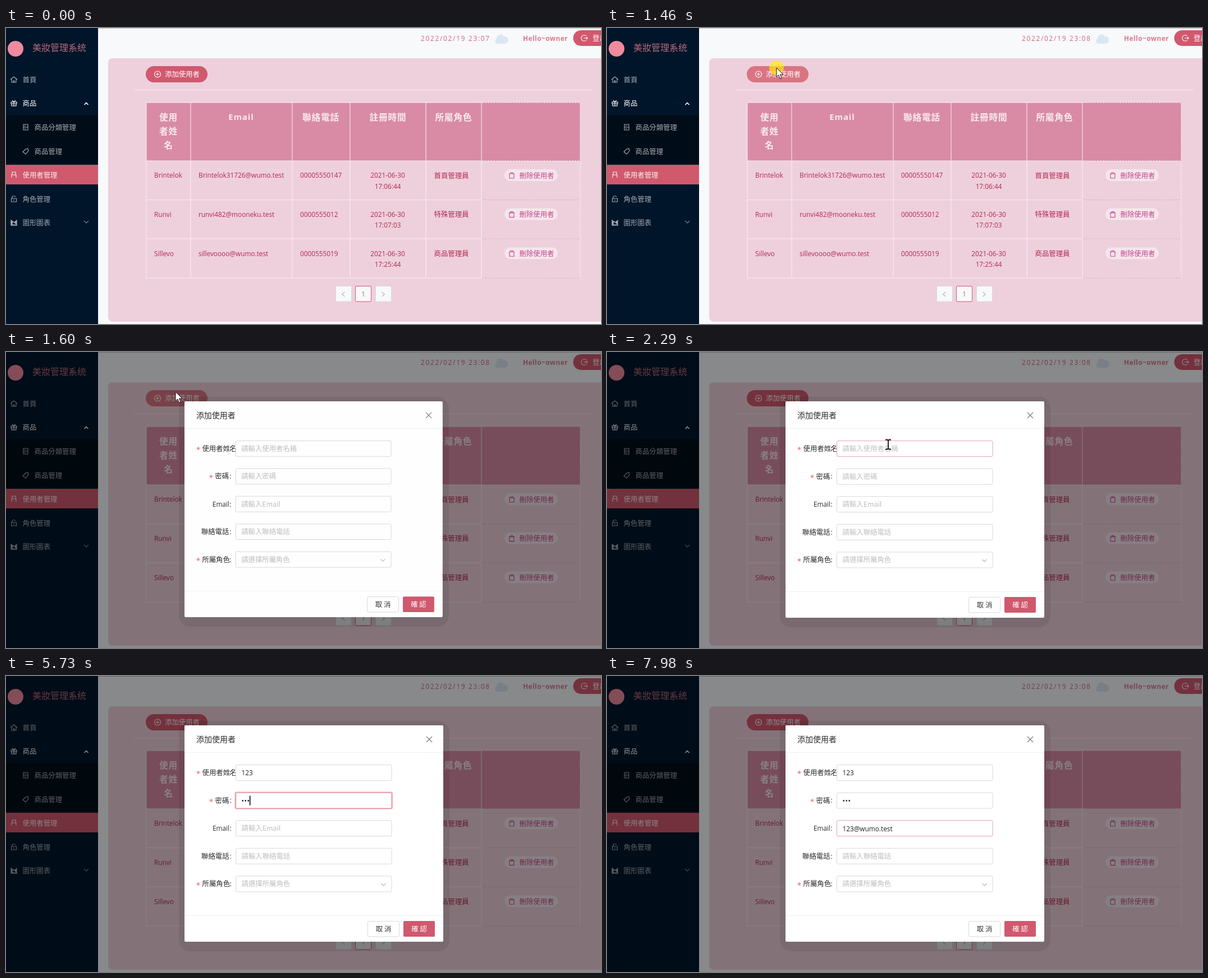
These frames come from a looping animation (1060x528 px, 8000 ms). An HTML page:

```html
<!DOCTYPE html>
<html lang="zh-Hant">
<head>
<meta charset="utf-8">
<style>
  html, body { margin: 0; width: 100%; height: 100%; overflow: hidden; background: #f7f9fa; }
  svg { display: block; width: 100vw; height: 100vh; }
  text { font-family: 'Open Sans', 'Noto Sans', sans-serif; white-space: pre; }
  .cjk { font-family: 'Noto Sans CJK TC', 'Noto Sans CJK SC', 'Noto Sans CJK JP', sans-serif; font-weight: 300; }
</style>
</head>
<body>
<svg id="stage" viewBox="0 0 1060 528"></svg>
<script>
const LOOP = 8000;
const ROSE = '#d0596e', GREY = '#d9d9d9', WINE = '#b5294f';
const stage = document.getElementById('stage');
const byId = id => document.getElementById(id);

// ---- drawing helpers ----
const isCjk = s => /[\u3400-\u9fff]/.test(s);

// Text is placed by its left (or middle) x and its vertical centre.
function text(s, x, cy, fill, { size, weight, anchor = 'start', spacing = 0, id = '' } = {}) {
  const cjk = isCjk(s);
  const px = size || (cjk ? 12.4 : 11.8);
  const bold = weight ? `style="font-weight:${weight}"` : '';
  return `<text ${id && `id="${id}"`} class="${cjk ? 'cjk' : ''}" ${bold} x="${x}" y="${cy + px * .37}"
    font-size="${px}" fill="${fill}" text-anchor="${anchor}" letter-spacing="${spacing}">${s}</text>`;
}
const rect = (x, y, w, h, fill, more = '') =>
  `<rect x="${x}" y="${y}" width="${w}" height="${h}" fill="${fill}" ${more}/>`;
const line = (d, stroke, more = '') => `<path d="${d}" fill="none" stroke="${stroke}" ${more}/>`;
const icon = (d, x, y, stroke, more = '') =>
  line(d, stroke, `transform="translate(${x} ${y})" stroke-width="1.1" ${more}`);

const ICONS = {
  home: 'M-6 0L0-5 6 0M-4-1V5H4V-1M-1 5V2H1V5',
  gift: 'M-5-2H5V1H-5zM-4 1V5H4V1M0-2V5M-3-5L0-2 3-5',
  list: 'M-4-5H4V5H-4zM-4 0H4M-2-2.5H0M-2 2.5H0',
  tag: 'M-5 1L0-4 4-5 5-1 0 5z',
  user: 'M-4 5V0H4V5M-3 0V-5H3V0',
  lock: 'M-4.5-1H4.5V5H-4.5zM-3-1V-4Q0-7 3-4M0 1V3',
  chart: 'M-5-5V5H6M-3 4V1L-1-2 1 0 5-4V4z',
  trash: 'M-5-3H5M-4-3V5H4V-3M-2-3V-5H2V-3',
  exit: 'M4 3.5A5.3 5.3 0 1 1 4-3.5M-1 0H6M4-2L6 0 4 2',
  plus: 'M-5.5 0A5.5 5.5 0 1 0 5.5 0 5.5 5.5 0 1 0-5.5 0M-3 0H3M0-3V3',
  down: 'M-4-2L0 2 4-2',
  up: 'M-3.5 2L0-1.5 3.5 2',
  close: 'M-5-5L5 5M5-5L-5 5'
};

// ---- page behind the dialog ----
function sidebar() {
  const items = [
    ['home', '首頁', 14, 92], ['gift', '商品', 14, 134, '#fff'],
    ['list', '商品分類管理', 35, 177], ['tag', '商品管理', 35, 220],
    ['user', '使用者管理', 14, 262, '#fbeef0'], ['lock', '角色管理', 14, 305],
    ['chart', '圖形圖表', 14, 347]
  ];
  return rect(0, 0, 164, 528, '#001529') + rect(0, 156, 164, 85, '#000c17') +
    rect(0, 244, 164, 35, ROSE) +
    '<circle cx="17" cy="37" r="14" fill="#f08a9e"/>' +
    text('美妝管理系统', 47, 35, '#b7697b', { size: 16, weight: 500 }) +
    items.map(([name, label, x, y, color = '#a6adb4']) =>
      icon(ICONS[name], x, y, color, name === 'chart' ? `style="fill:${color}"` : '') +
      text(label, x + 15.5, y, color)).join('') +
    icon(ICONS.up, 143, 135, '#fff', 'style="stroke-width:1.6"') + icon(ICONS.down, 143, 346, '#7d868f');
}

function topBar() {
  return rect(164, 0, 896, 528, '#f7f9fa') + rect(164, 0, 896, 1, '#bcbec0') +
    text('2022/02/19 23:07', 739, 18.5, '#d2667c', { spacing: 1.75, id: 'clock' }) +
    '<path d="M874 28a5 5 0 0 1 0-9 7 7 0 0 1 13-4 6.500 6.500 0 0 1 2 13z" fill="#dbe6f3"/>' +
    text('Hello~owner', 921, 18.5, '#d97a8b', { weight: 700, spacing: .5 }) +
    rect(1010.500, 4, 80, 28, ROSE, 'rx="14"') +
    icon(ICONS.exit, 1030, 18, '#fff') + text('登出', 1045, 18, '#fff');
}

function table() {
  const cols = [250, 329, 510, 613, 748, 847, 1023], rows = [133, 237, 306.5, 376, 446];
  const heads = [['Email', 419, 159], ['聯絡電話', 561, 159], ['註冊時間', 680.500, 159], ['所屬角色', 797.5, 159],
    ['使用', 289.5, 159], ['者姓', 289.5, 184], ['名', 289.5, 209]];
  const people = [
    ['Brintelok', 'Brintelok31726@wumo.test', '00005550147', '17:06:44', '首頁管理員'],
    ['Runvi', 'runvi482@mooneku.test', '0000555012', '17:07:03', '特殊管理員'],
    ['Sillevo', 'sillevoooo@wumo.test', '0000555019', '17:25:44', '商品管理員']
  ];
  const white = '#f9eff3', mid = { anchor: 'middle' };
  return rect(250, 133, 773, 104, '#d98ba5') +
    rows.map((y, i) => line(`M250 ${y}H847`, white) +
      line(`M848 ${y}H1023`, i > 1 ? '#eaa6b3' : white, 'stroke-dasharray="3 2"')).join('') +
    cols.map((x, i) => line(`M${x} 133V446`, white, i === 6 ? 'stroke-dasharray="3 1"' : '')).join('') +
    heads.map(([s, x, y]) => text(s, x, y, '#f8ebf0',
      { size: isCjk(s) ? 15.6 : 14.8, weight: 700, spacing: .9, ...mid })).join('') +
    people.map(([name, mail, phone, time, role], i) => {
      const y = 263 + i * 69.6;
      return text(name, 264, y, WINE) + text(mail, 343, y, WINE) + text(phone, 524, y, WINE) +
        text('2021-06-30', 680, y, WINE, mid) + text(time, 680, y + 19.5, WINE, mid) +
        text(role, 762.5, y, WINE) +
        rect(888, y - 11, 95, 21, '#f4e6ec', 'rx="10.5"') +
        icon(ICONS.trash, 901, y, '#c4468a') + text('刪除使用者', 914.5, y, '#c4468a');
    }).join('');
}

function pager() {
  const box = (x, stroke) => rect(x + .5, 460.5, 28, 27.5, '#f7f9fb', `stroke="${stroke}" rx="1.5"`);
  return box(587, GREY) + box(622, ROSE) + box(658, GREY) +
    icon('M2.5-4L-2.5 0 2.5 4', 601, 475, '#b5b5b5') + icon('M-2.5-4L2.5 0-2.5 4', 672, 475, '#b5b5b5') +
    text('1', 636.5, 474.5, ROSE, { anchor: 'middle' });
}

function page() {
  return topBar() + rect(182, 54, 900, 470, '#eed0dc', 'rx="8"') +
    rect(249, 68, 110, 29, ROSE, 'rx="14.5" id="addButton"') +
    icon(ICONS.plus, 270, 82.5, '#fff') + text('添加使用者', 283, 82.5, '#fff') +
    line('M228 110.5H1045', '#f7e9ef') + table() + pager() + sidebar();
}

// ---- dialog ----
const FIELDS = [
  { label: '使用者姓名', x: 349.5, star: 339, hint: '請輸入使用者名稱' },
  { label: '密碼', x: 372.5, star: 362, hint: '請輸入密碼' },
  { label: 'Email', x: 368, hint: '請輸入Email' },
  { label: '聯絡電話', x: 348, hint: '請輸入聯絡電話' },
  { label: '所屬角色', x: 349.5, star: 339, hint: '請選擇所屬角色' }
].map((field, i) => ({ ...field, cy: 172.5 + i * 49.6 }));

function dialog() {
  return rect(308, 80, 482, 411, '#000', 'rx="20" opacity=".08"') +
    rect(318, 88, 461, 386, '#fff', 'rx="2"') +
    line('M318 136.5H779M318 427.5H779', '#f0f0f0') +
    text('添加使用者', 339, 113, '#2b2b2b', { size: 14 }) +
    icon(ICONS.close, 754, 113, '#777') +
    FIELDS.map(f => text(f.label, f.x, f.cy, '#2b2b2b') + text(':', 398.5, f.cy, '#2b2b2b') +
      (f.star ? text('*', f.star, f.cy + 2, '#ff4d4f', { size: 13 }) : '')).join('') +
    '<g id="fields"></g>' +
    rect(644.5, 437.5, 56, 27.5, '#fff', `stroke="${GREY}" rx="2"`) +
    text('取 消', 672.5, 451.5, '#333', { anchor: 'middle' }) +
    rect(708, 437, 56, 28, ROSE, 'rx="2"') +
    text('確 認', 736, 451.5, '#fff', { anchor: 'middle', weight: 400 });
}

// ---- pointer ----
// Each leg: start, last step, step count, from x y, to x y, time it is hidden or replaced.
const LEGS = [
  [370, 1140, 11, 990, 545, 266, 60, 1300],
  [1300, 1300, 1, 266, 60, 302, 71, 1910],
  [1910, 2290, 5, 302, 71, 501, 165, 3220],
  [3620, 3850, 4, 501, 165, 506, 220, 4240],
  [4950, 5105, 3, 506, 220, 1021, 132, 5180],
  [6040, 6260, 4, 998, 32, 590, 187, 6430],
  [6430, 6620, 4, 590, 187, 579, 270, 6960],
  [7110, 7185, 2, 434, 220, 712, 272, 7260]
];
const CLICKS = [[1460, 1540], [2400, 2540], [3930, 4150], [6650, 6810]];
const within = (t, spans) => spans.some(([a, b]) => t >= a && t < b);

function pointerAt(t) {
  const leg = LEGS.find(l => t >= l[0] && t < l[7]);
  if (!leg) return null;
  const [start, end, steps, x0, y0, x1, y1] = leg;
  const done = t >= end ? steps : Math.floor((t - start) / (end - start) * (steps - 1)) + 1;
  const p = done / steps;
  return { x: x0 + (x1 - x0) * p, y: y0 + (y1 - y0) * p };
}

const overField = (pt, f) => pt && pt.x > 409 && pt.x < 687 && Math.abs(pt.y - f.cy) < 14;

function pointer(pt, t) {
  if (!pt) return '';
  const beam = t >= 1910 && FIELDS.some(f => overField(pt, f));
  const glow = within(t, CLICKS)
    ? `<circle cx="${pt.x - (beam ? 2 : 0)}" cy="${pt.y}" r="13" fill="#fff000" opacity=".65"/>` : '';
  const at = `transform="translate(${pt.x} ${pt.y})"`;
  return glow + (beam
    ? line('M-5-8.500H-1.500L0-7.500 1.500-8.500H5M0-8V8M-5 8.500H-1.500L0 7.500 1.500 8.500H5', '#111', `stroke-width="1.8" ${at}`)
    : `<path d="M0 0V16.500L3.800 13 6.500 19.500 9.200 18.300 6.500 12H12z" fill="#fff" stroke="#111" ${at}/>`);
}

// ---- form state ----
const FOCUS = [[2540, 4080], [4080, 5810], [6810, 7980]];
const CARETS = [[[2620, 2990], [3220, 4000]], [[4000, 5180], [5730, 5810]], [[6810, 7510]]];
const typed = (t, ...times) => times.filter(at => t >= at).length;

function fields(t, pt) {
  const digits = typed(t, 3220, 3320, 3540), dots = typed(t, 4240, 4480, 4700), pasted = t >= 6960;
  const values = ['123'.slice(0, digits), '•'.repeat(dots), pasted ? '123@wumo.test' : ''];
  const caretX = [420 + digits * 6.75, 419.8 + dots * 5, pasted ? 508 : 420];

  return FIELDS.map((f, i) => {
    const focused = FOCUS[i] && within(t, [FOCUS[i]]);
    const hovered = t >= 1910 && overField(pt, f) || i === 2 && t >= 7980;
    const border = focused ? '#de7b89' : hovered ? '#e6a3b0' : GREY;
    const top = f.cy - 14;
    const halo = focused
      ? rect(408.5, top - .5, 279.5, 29, 'none', `stroke="#f0b4bd" stroke-width="2.5" rx="2" opacity="${t >= 7890 ? .4 : .85}"`) : '';
    const value = values[i];
    const content = value
      ? text(value, 419.5, f.cy + .5, '#222', { spacing: i === 1 ? .55 : 0 })
      : text(f.hint, 419.5, f.cy, '#bfbfbf');
    const caret = CARETS[i] && within(t, CARETS[i]) ? rect(caretX[i] - 1, f.cy - 8.5, 1.7, 17, '#111') : '';
    return halo + rect(409.5, top, 277.5, 28, '#fff', `stroke="${border}" rx="2"`) + content + caret;
  }).join('') + icon(ICONS.down, 672.5, 372, '#b5b5b5');
}

// ---- playback ----
const OPENING = [1680, 1600, 1540, 1460];
const clamp = v => Math.min(1, Math.max(0, v));

function render(t) {
  const pt = pointerAt(t);
  const opened = (OPENING.find(at => t >= at) || 1460) - 1460;
  const zoom = 1 - (1 - clamp(opened / 210)) ** 5.3;

  byId('clock').textContent = '2022/02/19 23:0' + (t < 120 ? 7 : 8);
  byId('addButton').setAttribute('fill', t >= 1300 && t < 1910 ? '#da7482' : ROSE);
  byId('mask').setAttribute('opacity', .45 * clamp(opened / 110));
  byId('dialog').setAttribute('opacity', zoom);
  byId('dialog').setAttribute('transform', `translate(302 72) scale(${.2 + .8 * zoom}) translate(-302 -72)`);
  byId('fields').innerHTML = fields(t, pt);
  byId('pointer').innerHTML = pointer(pt, t);
}

stage.innerHTML = page() + rect(0, 0, 1060, 528, '#000', 'id="mask"') +
  `<g id="dialog">${dialog()}</g><g id="pointer"></g>`;

const begin = performance.now();
function tick() {
  render((performance.now() - begin) % LOOP);
  requestAnimationFrame(tick);
}
tick();
</script>
</body>
</html>
```
